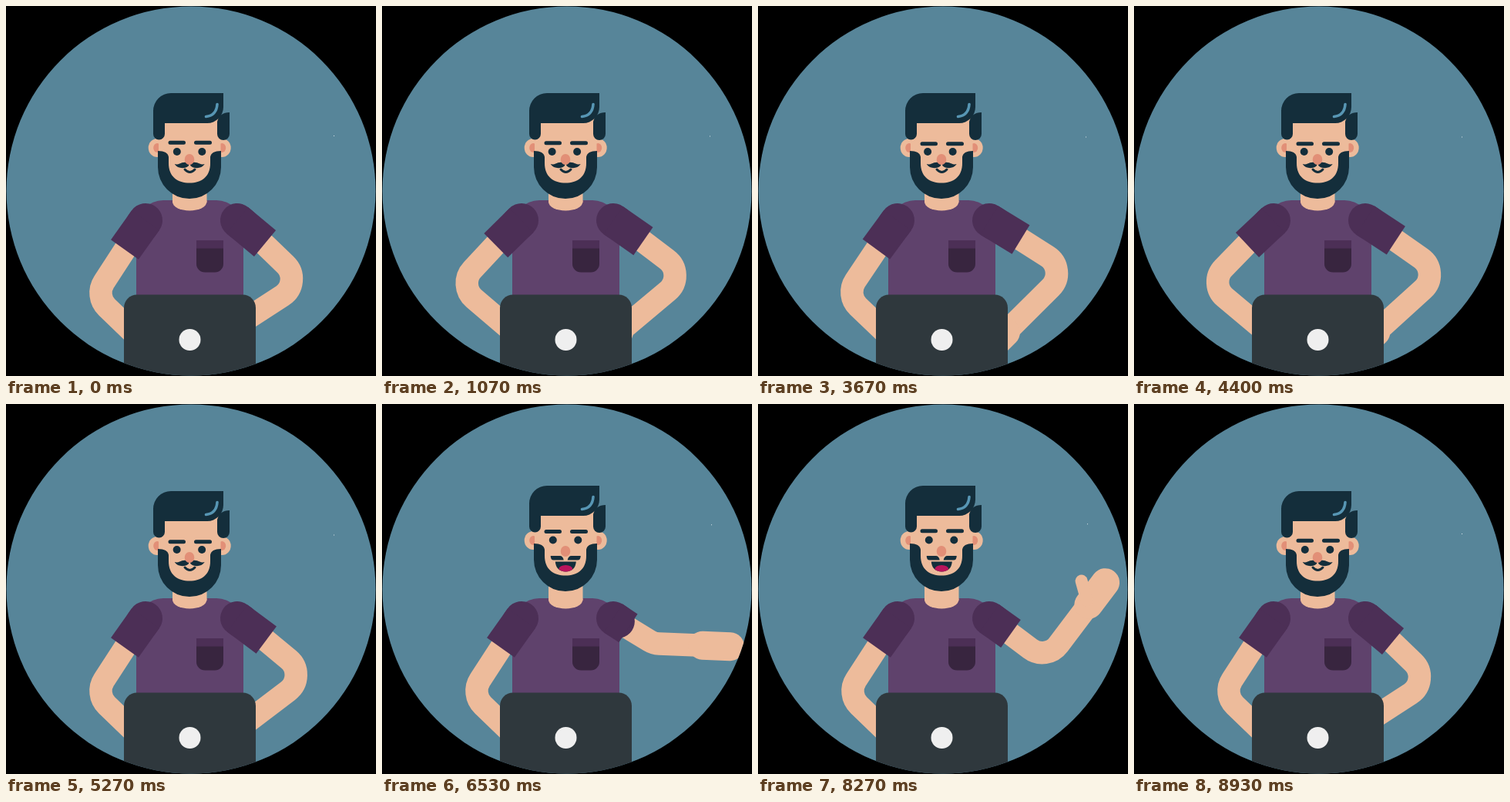
Animation, 480 px wide and 480 px high, one loop 8990 ms. Source, as an HTML page with a canvas:

```html
<!DOCTYPE html>
<html lang="en">
<head>
<meta charset="utf-8">
<title>Typing and waving</title>
<style>
  html, body { margin: 0; width: 100%; height: 100%; overflow: hidden; background: #000; }
  canvas { display: block; width: 100vw; height: 100vh; }
</style>
</head>
<body>
<canvas id="stage" width="480" height="480"></canvas>
<script>
const ctx = document.getElementById('stage').getContext('2d');
const LOOP = 8990;
const KEY_PRESS = 1757;
const TYPING = 3 * KEY_PRESS;
const C = {
  sky: '#578599', skin: '#edbb9b', blush: '#e28f77', hair: '#142e3b', shine: '#5796b4',
  shirt: '#5f426c', sleeve: '#4c2f56', pocket: '#38253f', laptop: '#2f383d',
  badge: '#efefef', tongue: '#b9155c'
};

// Right arm poses: cuff x, y, elbow x, y, forearm angle, forearm length
const REST = [336, 308, 386, 358, 147, 115];
const REACH = [341, 303, 403, 342, 135, 115];
const WAVE = [328, 298, 374, 333, -53, 91];
const FOLD = [-14, -13, -32, -38, 0, -45];   // foreshortening halfway through the swing

const mix = (a, b, k) => a + (b - a) * k;
const clamp = v => Math.max(0, Math.min(1, v));
const ease = u => clamp(u) ** 2 * (3 - 2 * clamp(u));
const hump = (t, span) => t < span ? Math.sin(Math.PI * t / span) : 0;
const held = (t, from, rise, until, fall) => ease((t - from) / rise) - ease((t - until) / fall);

function fill(color, d) {
  ctx.fillStyle = color;
  ctx.fill(new Path2D(d));
}
function stroke(color, width, d, cap = 'round') {
  ctx.strokeStyle = color;
  ctx.lineWidth = width;
  ctx.lineCap = cap;
  ctx.stroke(new Path2D(d));
}
function oval(color, x, y, rx, ry = rx) {
  ctx.fillStyle = color;
  ctx.beginPath();
  ctx.ellipse(x, y, rx, ry, 0, 0, 7);
  ctx.fill();
}
function box(color, x, y, w, h, radii = 0) {
  ctx.fillStyle = color;
  ctx.beginPath();
  ctx.roundRect(x, y, w, h, radii);
  ctx.fill();
}
function shifted(x, y, draw) {
  ctx.save();
  ctx.translate(x, y);
  draw();
  ctx.restore();
}
// Draws the same shape on both sides of the face
function mirrored(draw) {
  for (const side of [-1, 1]) {
    shifted(238.2, 0, () => {
      ctx.scale(side, 1);
      draw();
    });
  }
}

function limb(cuffX, cuffY, elbowX, elbowY, handX, handY) {
  const p = new Path2D();
  p.moveTo(cuffX, cuffY);
  p.arcTo(elbowX, elbowY, handX, handY, 26);
  p.lineTo(handX, handY);
  ctx.strokeStyle = C.skin;
  ctx.lineWidth = 29.5;
  ctx.lineCap = 'butt';
  ctx.stroke(p);
}

function sleeve(x, y, endX, endY) {
  const k = 7 / Math.hypot(endX - x, endY - y);
  stroke(C.sleeve, 44, `M${x} ${y}L${mix(x, endX, k)} ${mix(y, endY, k)}`);
  stroke(C.sleeve, 44, `M${x} ${y}L${endX} ${endY}`, 'butt');
}

function drawLeftArm(t) {
  // Three presses, the middle one half as strong
  const strength = Math.floor(t / KEY_PRESS) === 1 ? .5 : 1;
  const k = t < TYPING ? strength * Math.sin(Math.PI * t / KEY_PRESS) ** 2 : 0;
  const endX = 154 - 7 * k, endY = 316 - 6 * k;
  const elbowX = 115.5 - 19 * k, elbowY = 376 - 16 * k;
  const angle = (44 - 4 * k) * Math.PI / 180;
  limb(endX + 5, endY - 7, elbowX, elbowY,
    elbowX + 100 * Math.cos(angle), elbowY + 100 * Math.sin(angle));
  sleeve(181, 278, endX, endY);
}

function drawRightArm(t) {
  const reach = 1.07 * hump(t, 5900);
  const raise = held(t, 6000, 815, 8400, 530);
  const [endX, endY, elbowX, elbowY, swing, length] = REST.map((v, i) =>
    mix(mix(v, REACH[i], reach), WAVE[i], raise) + FOLD[i] * Math.sin(Math.PI * raise));
  const degrees = swing + 9 * raise * Math.sin(2 * Math.PI * (t - 8270) / 700);
  const angle = degrees * Math.PI / 180;
  const handX = elbowX + length * Math.cos(angle), handY = elbowY + length * Math.sin(angle);
  limb(endX - 6, endY - 4, elbowX, elbowY, handX, handY);

  shifted(handX, handY, () => {
    ctx.rotate(angle);
    stroke(C.skin, 37, 'M0 0H36');
    const thumb = clamp(-degrees / 40);
    if (thumb) stroke(C.skin, 16, `M3 -5L19 ${-5 - 21 * thumb}`);
  });
  sleeve(300, 278, endX, endY);
}

function drawBody() {
  box(C.shirt, 169, 252, 139, 150, [35, 35, 0, 0]);
  box(C.skin, 216, 225, 44.5, 30);
  oval(C.skin, 238.2, 254, 22.2, 11.5);
  box(C.pocket, 247, 304, 35, 41.5, [0, 0, 11, 11]);
  box(C.sleeve, 247, 304, 35, 10.5);
}

function drawMouth(open) {
  if (open < .4) {
    mirrored(() => fill(C.hair, 'M1 205C4 201 10 203 13 204.5Q16 206 19.5 205C16 211 6 212 1 207Z'));
    stroke(C.hair, 3, 'M232 212Q238.5 219 245 212');
    return;
  }
  mirrored(() => fill(C.hair, 'M19.5 204H7.500Q3.500 204 2.500 209.500H15.500Q19.500 209.500 19.500 204Z'));
  shifted(238.3, 211.5, () => {
    ctx.scale(1, open);
    const lips = new Path2D('M-13.5 0H13.5C13 8 8 13 0 13S-13 8 -13.5 0Z');
    ctx.fillStyle = C.hair;
    ctx.fill(lips);
    ctx.clip(lips);
    oval(C.tongue, 0, 10, 9, 5.5);
  });
}

function drawHead(t) {
  const lift = held(t, 5600, 300, 8450, 350);
  shifted(0, -7 * lift, () => {
    mirrored(() => {
      oval(C.skin, 42, 184, 11.5, 12);
      oval(C.blush, 42, 184, 5, 6);
    });
    box(C.skin, 198, 145, 80.5, 60);
    fill(C.hair, 'M197 188Q210 188 211 196V200H265V196Q266 188 279 188V209A41 41 0 0 1 197 209Z');
    fill(C.skin, 'M211 195H265V204C265 222 253 229.5 238 229.5S211 222 211 204Z');
    fill(C.hair, 'M191 136A23 23 0 0 1 214 113H282V131A21 21 0 0 1 261 152H206V166A7.5 7.5 0 0 1 191 166Z');
    fill(C.hair, 'M290 138V166A8 8 0 0 1 274 166V150Q277 138 290 138Z');
    stroke(C.shine, 3.6, 'M274 127.5Q273 142 259.5 143.5');
    drawMouth(lift);
    oval(C.blush, 238, 199 - lift, 6.3, 7);
  });
  shifted(-2 * hump(t, 5400), -12.5 * lift, () => {
    oval(C.hair, 221.8, 189, 5);
    oval(C.hair, 254.3, 189, 5);
  });
  shifted(0, 1.5 * hump(t, LOOP) - 13 * lift, () => {
    stroke(C.hair, 5, 'M213 177.3H230.5M246.5 177.3H264.5');
    box('#dce6ea', 425 + 2 * lift, 168, 1, 1);
  });
}

function draw(t) {
  ctx.fillStyle = '#000';
  ctx.fillRect(0, 0, 480, 480);
  ctx.save();
  ctx.beginPath();
  ctx.arc(240, 240, 239.5, 0, 7);
  ctx.clip();
  ctx.fillStyle = C.sky;
  ctx.fillRect(0, 0, 480, 480);
  drawBody();
  drawLeftArm(t);
  drawRightArm(t);
  drawHead(t);
  box(C.laptop, 153, 374.5, 171, 130, 17);
  oval(C.badge, 238.5, 433, 14);
  ctx.restore();
}

const start = performance.now();
function tick() {
  draw((performance.now() - start) % LOOP);
  requestAnimationFrame(tick);
}
tick();
</script>
</body>
</html>
```
